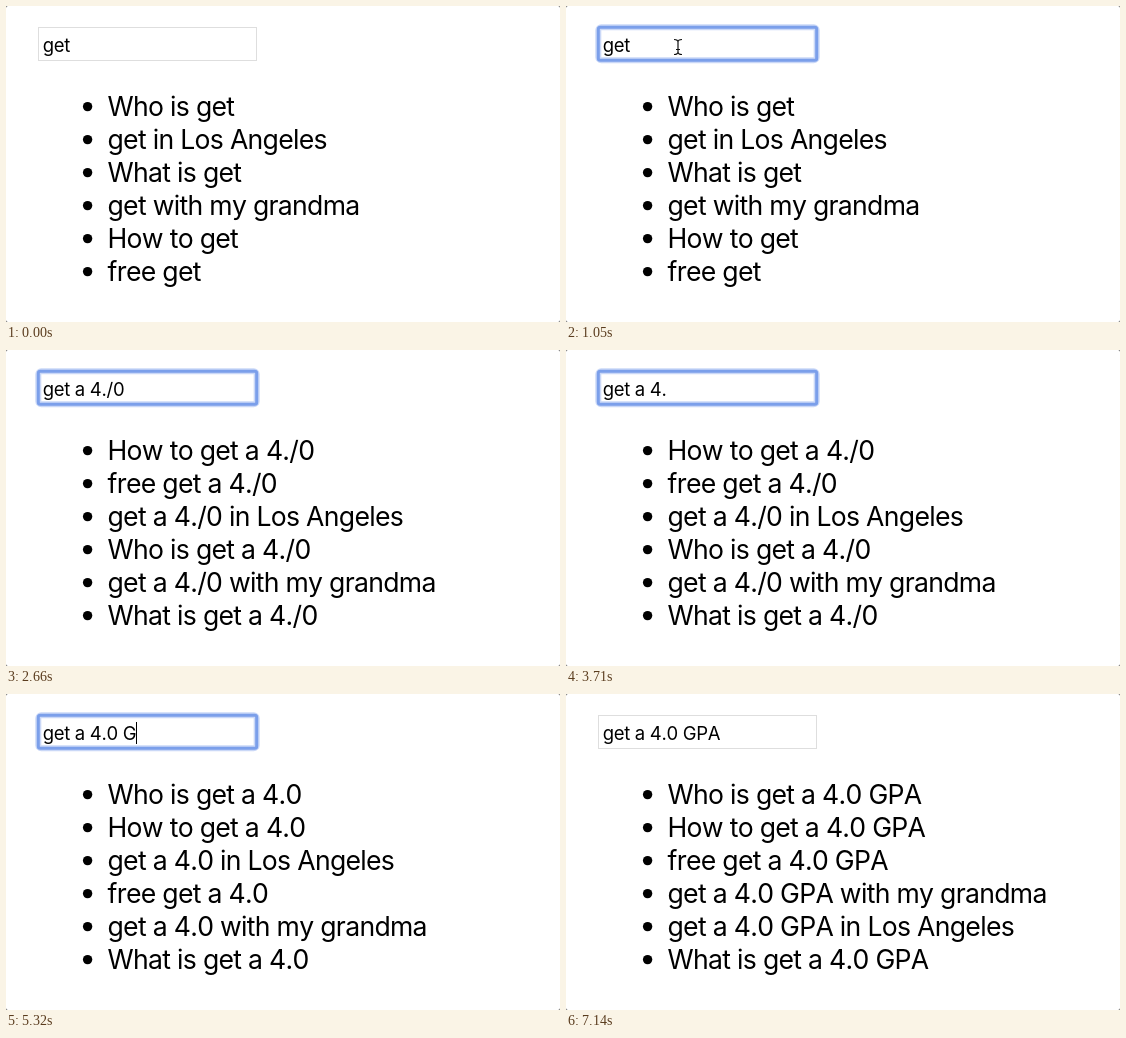
These frames come from a looping animation (554x316 px, 7420 ms). An HTML page:

```html
<!DOCTYPE html>
<html lang="en">
<head>
<meta charset="utf-8">
<title>Search suggestions</title>
<style>
  html, body { margin: 0; width: 100%; height: 100%; overflow: hidden; background: #fff; }
  svg { display: block; width: 554px; height: 316px; }
  text { font-family: Inter, Roboto, sans-serif; white-space: pre; font-variant-ligatures: none; font-kerning: none; }
  #query { font-size: 18.5px; letter-spacing: -0.3px; }
  #list text { font-size: 26.6px; letter-spacing: -0.7px; }
</style>
</head>
<body>
<svg viewBox="0 0 554 316">
  <path d="M0 0h554v316h-554zM2 0Q0 0 0 2V314Q0 316 2 316H552Q554 316 554 314V2Q554 0 552 0z" fill="#555" fill-rule="evenodd"/>
  <rect x="32.5" y="21.5" width="218" height="33" fill="#fff" stroke="#dedede"/>
  <g id="focus" fill="none">
    <rect x="32.3" y="21.3" width="218.4" height="32.9" rx="3" stroke="#7b9fea" stroke-opacity=".4" stroke-width="6"/>
    <rect x="32.3" y="21.3" width="218.4" height="32.9" rx="2" stroke="#7b9fea" stroke-width="3"/>
  </g>
  <text id="query" x="36.7" y="46"></text>
  <rect id="caret" y="28" width="1" height="22"/>
  <g id="list"></g>
  <g id="mouse">
    <circle id="ring" r="16.5" fill="none" stroke="#333" stroke-width="1.5"/>
    <path id="beam" d="M-4 -7.5Q0 -7.5 0 -5Q0 -7.5 4 -7.5M0 -5V5M-4 7.5Q0 7.5 0 5Q0 7.5 4 7.5M-2 2.5H2" fill="none" stroke="#111" stroke-width="1.2"/>
    <path id="arrow" d="M0 0V15L3.5 11.8L6 17L8.3 16L6 10.8H10.8Z" stroke="#fff"/>
  </g>
</svg>
<script>
const LOOP = 7420, STEP = 70;
const $ = id => document.getElementById(id);
const show = (id, on) => $(id).setAttribute('visibility', on ? 'inherit' : 'hidden');

const typing = [
  [0, 'get'], [1330, 'get '], [1540, 'get a'], [1680, 'get a '], [1890, 'get a 4'],
  [2030, 'get a 4./'], [2100, 'get a 4./0'], [3150, 'get a 4./'], [3290, 'get a 4.'],
  [4270, 'get a 4.0'], [5110, 'get a 4.0 '], [5320, 'get a 4.0 G'],
  [5460, 'get a 4.0 GP'], [5530, 'get a 4.0 GPA']
];

// Each digit picks one template; the order is reshuffled on every search.
const templates = ['Who is *', '* in Los Angeles', 'What is *', '* with my grandma', 'How to *', 'free *'];
const searches = [
  [0, 'get', '012345'], [2660, 'get a 4./0', '451032'], [3850, 'get a 4.', '105234'],
  [4830, 'get a 4.0', '041532'], [6090, 'get a 4.0 GPA', '045312']
];

const blinks = [
  [0, false], [560, true], [1050, false], [1330, true], [2660, false], [3150, true],
  [3710, false], [4200, true], [4830, false], [5110, true], [6090, false], [6580, true], [7080, false]
];

const latest = (track, t) => track.filter(entry => entry[0] <= t).pop();
const clamp = v => Math.max(0, Math.min(1, v));
const between = (t, from, to) => t >= from && t < to;

const svgNode = (tag, attrs) => {
  const node = document.createElementNS('http://www.w3.org/2000/svg', tag);
  for (const name in attrs) node.setAttribute(name, attrs[name]);
  return $('list').appendChild(node);
};
const rows = templates.map((_, i) => {
  svgNode('circle', { cx: 81.6, cy: 100.6 + 33 * i, r: 4.7 });
  return svgNode('text', { x: 101.5, y: 110 + 33 * i });
});

function mousePosition(t) {
  if (t < 1330) {
    const u = clamp((t - 70) / 490), v = 1 - u;
    return [v * v * 338 + 2 * u * v * 270 + u * u * 112, 2 * u * v * 470 + u * u * 41];
  }
  if (t >= 7000) return [264, 324.5];
  const u = clamp((t - 6230) / 490);
  return [112 + 130 * u, 41 + 285 * u * u * (1.6 - 0.6 * u)];
}

function drawMouse(t) {
  const [x, y] = mousePosition(t);
  const overInput = between(x, 32, 251) && between(y, 21, 55);
  const visible = between(t, 70, 1330) || between(t, 6230, 7140);
  $('mouse').setAttribute('transform', `translate(${x} ${y})`);
  show('mouse', visible);
  show('beam', overInput);
  show('arrow', !overInput);
  show('ring', between(t, 560, 840) || between(t, 7000, 7140));
}

function draw(time) {
  const t = Math.floor((time % LOOP) / STEP) * STEP;
  $('query').textContent = latest(typing, t)[1];
  $('caret').setAttribute('x', Math.round(36.7 + $('query').getComputedTextLength()));
  show('caret', latest(blinks, time % LOOP)[1]);
  show('focus', between(t, 560, 7140));
  const [, term, order] = latest(searches, t);
  rows.forEach((row, i) => { row.textContent = templates[order[i]].replace('*', term); });
  drawMouse(t);
}

const start = performance.now();
function tick() {
  draw(performance.now() - start);
  requestAnimationFrame(tick);
}
tick();
</script>
</body>
</html>
```
